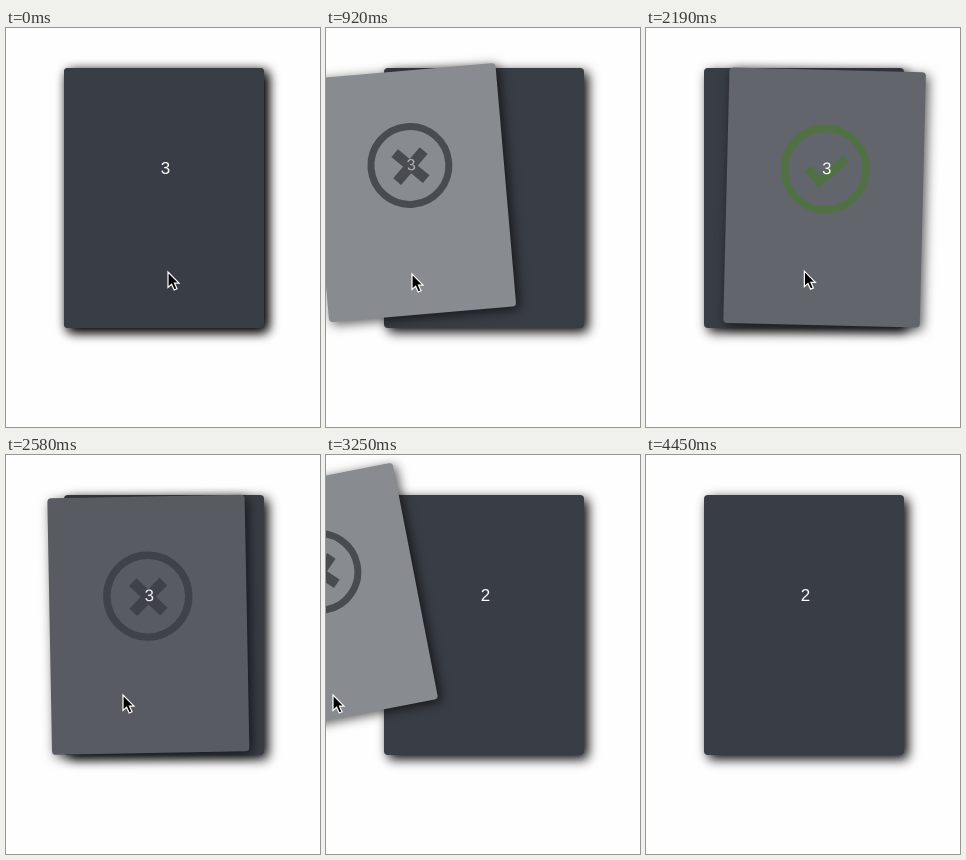
Write an HTML page that moves like this. It is 314 px wide and 399 px high and loops after 4.71 s.

```html
<!DOCTYPE html>
<html>
<head>
<meta charset="utf-8">
<style>
html, body { margin: 0; width: 100%; height: 100%; overflow: hidden; background: #fefefe; }
#stage { position: fixed; inset: 0; overflow: clip; contain: strict; }
.card {
  position: absolute; left: 58px; top: 40px; width: 200px; height: 260px;
  border-radius: 4px; background: #393d45; box-shadow: 4px 4px 12px #000;
}
#top { box-shadow: 3px 3px 12px rgba(0, 0, 0, .65); }
.num {
  position: absolute; left: 1.5px; top: 90px; width: 100%; line-height: 21px; text-align: center;
  font-family: "Liberation Sans", Arial, sans-serif; font-size: 17px; color: #fff;
}
svg { position: absolute; overflow: visible; fill: none; }
#icon { left: 100px; top: 101px; width: 1px; height: 1px; }
#cursor { left: 0; top: 0; width: 14px; height: 20px; }
</style>
</head>
<body>
<div id="stage">
  <div class="card"><div class="num">2</div></div>
  <div class="card" id="top">
    <svg id="icon">
      <circle r="41.5" stroke-width="7.5"/>
      <path id="cross" d="M-15-14.5L16 16M16-14.5L-15 16" stroke-width="11"/>
      <path id="check" d="M-18 0L-6 13L21-11" stroke-width="9"/>
    </svg>
    <div class="num" id="num">3</div>
  </div>
  <svg id="cursor"><path d="M0 0V15.5L3.6 12.3L6.2 18L9 16.8L6.5 11.2H11Z" fill="#000" stroke="#fff" stroke-width="1.2"/></svg>
</div>
<script>
const LOOP = 4710, GONE = 3530;
const $ = id => document.getElementById(id);
const progress = (t, from, to) => Math.min(1, Math.max(0, (t - from) / (to - from)));

// Out and back again between two times
const swing = (t, from, to) => Math.sin(Math.PI * progress(t, from, to)) ** 2;

// Card offset: a swing left, a swing right, then a throw to the left
const drag = t => -72 * swing(t, 460, 1350) + 75 * swing(t, 1350, 2370)
  - 244 * progress(t, 2400, GONE) ** 1.5;

// Cursor stops: time, x, y
const stops = [[260, 162, 244], [600, 92, 245], [920, 86, 246], [1740, 210, 247],
  [2580, 117, 240], [3250, 7, 240], [3550, 7, 243], [3910, 175, 311], [4090, 175, 311], [4450, 256, 402]];

function cursorAt(t) {
  const i = Math.max(1, stops.findIndex(s => s[0] > t));
  const a = stops[i - 1], b = t < stops.at(-1)[0] ? stops[i] : stops.at(-1);
  const u = t < stops.at(-1)[0] ? progress(t, a[0], b[0]) : 1;
  const ease = u * u * (3 - 2 * u);
  return [1, 2].map(k => a[k] + (b[k] - a[k]) * ease);
}

function draw(t) {
  const x = drag(t), far = Math.abs(x), right = x > 0;
  const scale = Math.max(.925, 1 - .00085 * far);
  const light = Math.min(.4, far * .01);
  const mix = c => Math.round(c + (255 - c) * light);

  const top = $("top").style;
  top.visibility = t < GONE ? "visible" : "hidden";
  top.transform = `translate(${x}px, ${-.00105 * x * x}px) rotate(${x * .0687}deg) scale(${scale})`;
  top.background = `rgb(${mix(57)}, ${mix(61)}, ${mix(69)})`;

  $("icon").style.opacity = .82 * Math.min(1, far / 12);
  $("icon").style.stroke = right ? "#4c743c" : "#3a3d43";
  $("cross").style.display = right ? "none" : "";
  $("check").style.display = right ? "" : "none";
  $("num").style.opacity = Math.max(.5, 1 - far * (right ? .0015 : .006));

  const [cx, cy] = cursorAt(t);
  $("cursor").style.transform = `translate(${cx}px, ${cy}px)`;
}

function tick() {
  draw(performance.now() % LOOP);
  requestAnimationFrame(tick);
}
tick();
</script>
</body>
</html>
```
